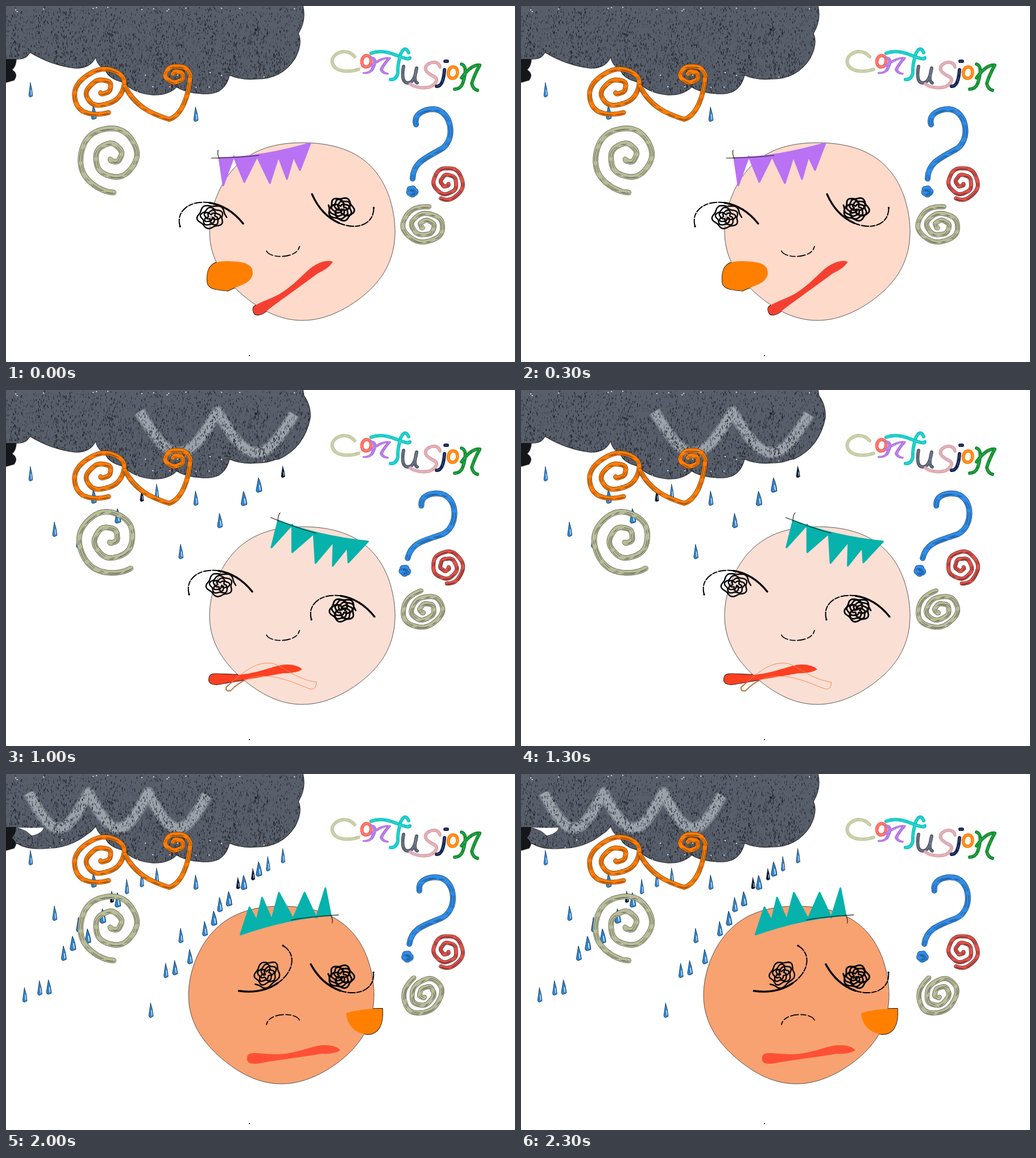
Animation, 895 px wide and 625 px high, one loop 2.5 s. Source, as an HTML page with a canvas:

```html
<!DOCTYPE html>
<html lang="en">
<head>
<meta charset="utf-8">
<title>Confusion</title>
<style>
html, body { margin: 0; width: 100%; height: 100%; overflow: hidden; background: #fff; }
canvas { display: block; }
</style>
</head>
<body>
<canvas id="stage" width="895" height="625"></canvas>
<script>
const ctx = document.getElementById('stage').getContext('2d');
const STEP = 500, POSES = 5, TAU = 2 * Math.PI;
const rad = deg => deg * Math.PI / 180;
const shape = d => new Path2D(d);

let seed = 1;
const rand = () => (seed = seed * 16807 % 2147483647) / 2147483647;

function fill(path, color) {
  ctx.fillStyle = color;
  ctx.fill(path);
}

function stroke(path, color, width, dash = []) {
  ctx.strokeStyle = color;
  ctx.lineWidth = width;
  ctx.setLineDash(dash);
  ctx.stroke(path);
}

// Moves the pivot to x, y and turns around it.
function posed([x, y, turn = 0], [px, py], draw) {
  ctx.save();
  ctx.translate(x, y);
  ctx.rotate(rad(turn));
  ctx.translate(-px, -py);
  draw();
  ctx.restore();
}

// Slightly shaky spiral from the outside in.
function coil({ x = 0, y = 0, from, to, start = 0, turns, flat = 1, tilt = 0, ease = 1, shake = .6 }) {
  const path = new Path2D(), steps = Math.ceil(Math.abs(turns) * 60);
  const c = Math.cos(rad(tilt)), s = Math.sin(rad(tilt));
  for (let i = 0; i <= steps; i++) {
    const t = i / steps, a = rad(start) + t * turns * TAU;
    const r = from + (to - from) * t ** ease + shake * Math.sin(a * 5.3);
    const u = r * Math.cos(a), v = r * flat * Math.sin(a);
    path.lineTo(x + u * c - v * s, y + u * s + v * c);
  }
  return path;
}

// Coloured band with a dark edge and loose dark scribbles inside.
function crayon(path, color, width, ink) {
  stroke(path, ink, width + 1);
  stroke(path, color, width - .4);
  for (const side of [-1, 1]) {
    posed([side * width * .22, width * .2], [0, 0],
      () => stroke(path, ink, .8, [13, 7, 22, 9, 6, 12]));
  }
}

// ---- cloud ----
const CLOUD = 'M0 0H522Q528 25 514 48Q522 66 508 92Q485 128 440 128Q412 130 393 121Q385 153 355 154' +
  'Q320 154 300 142Q285 157 258 156Q222 152 208 134Q180 128 175 112Q160 104 158 89Q148 110 122 109' +
  'Q80 104 42 81Q36 94 18 93Q17 107 10 112Q22 120 14 130L0 134Z';
const BULGES = ['', '',
  'M515 0Q536 20 535 48Q525 100 480 121L440 128V0Z',
  'M0 0L150 98Q110 112 75 95Q58 82 54 95Q45 106 25 108L0 125Z',
  'M0 60L158 92Q120 130 75 130Q40 134 20 122L0 125Z'];
const HOLE = shape('M20 94Q45 95 66 94Q64 104 45 108Q36 98 20 94Z');
const CHALK = [
  null,
  { x: 160, span: 72, count: 5, base: 62, height: 42 },
  { x: 235, span: 137, count: 2, base: 110, height: 72 },
  { x: 25, span: 95, count: 3, base: 85, height: 55 },
  { x: 40, span: 105, count: 3, base: 95, height: 62 }];

// Row of hanging bows that meet in upward points.
function bows({ x, span, count, base, height }) {
  const path = new Path2D();
  for (let s = 0; s <= count; s += .02) {
    path.lineTo(x + span * s, base - height * (1 - Math.abs(Math.sin(Math.PI * s))));
  }
  return path;
}

function drawCloud(k) {
  const cloud = shape(CLOUD + BULGES[k]);
  seed = 77;
  ctx.save();
  stroke(cloud, '#1a1c20', 1.6);
  ctx.clip(cloud);
  fill(cloud, '#585f6b');
  if (CHALK[k]) {
    ctx.lineCap = 'butt';
    const path = bows(CHALK[k]);
    stroke(path, 'rgba(190,195,200,.35)', 21);
    stroke(path, k === 1 ? 'rgba(190,195,200,.25)' : 'rgba(190,195,200,.5)', 15);
  }
  for (let i = 0; i < 5500; i++) {
    const x = rand() * 540, y = 160 * rand() ** .8;
    const streak = .6 + .4 * Math.sin(x * .11) * Math.sin(x * .037 + y * .02);
    ctx.fillStyle = rand() < streak ? '#1f2127' : '#464c57';
    ctx.fillRect(x, y, .5 + rand() * .9, 1 + rand() * 3.5);
  }
  fill(shape('M0 93H18Q17 107 10 112Q22 120 14 130L0 134Z'), '#15161a');
  ctx.fillStyle = '#fff';
  for (let i = 0; i < 40; i++) ctx.fillRect(rand() * 510, i % 3 ? 115 + rand() * 40 : rand() * 9, 2, 1.5);
  ctx.restore();
  if (k === 4) fill(HOLE, '#fff');
}

// ---- rain: more drops each pose, reaching further down ----
const DROP = shape('M-1 -13L-5 9Q-4 13 0 12L5 10Q4 -2 -1 -13Z');
const DROP_COUNT = [3, 6, 13, 22, 33];

function drawRain(k) {
  for (let i = 0; i < DROP_COUNT[k]; i++) {
    const born = DROP_COUNT.findIndex(n => i < n);
    const x = 20 + 470 * ((i * .618 + .05) % 1);
    const depth = (40 + 85 * born) * (1 - x / 900);
    const y = 137 + 40 * Math.sin(x / 500 * Math.PI) + depth * (i * .755 % 1);
    const fresh = born === k && i > 5 && i % 4 === 0;
    posed([x, y], [0, 0], () => {
      ctx.scale(.65 + i % 4 * .12, fresh ? .8 : 1);
      fill(DROP, fresh ? '#06102c' : '#3187d2');
      stroke(DROP, '#173a5c', 1);
      stroke(shape('M1 0L2 8'), '#fff', 1.4);
    });
  }
}

// ---- swirls and question mark, each swinging around its pivot ----
const GREEN = '#b9bd98', ORANGE = '#ff7d08', BLUE = '#2f8de8';
const SWIRLS = [
  { color: ORANGE, ink: '#6b3c0c', width: 7.5, pivot: [225, 157], swing: [0, 26, 0, -12, 0], paths: [
    coil({ x: 169, y: 147, from: 55, to: 7, start: 97, turns: 2.1, flat: .75, tilt: -25, ease: 1.2 }),
    shape('M209 141C228 178 258 190 287 199C310 192 322 155 324 122'),
    coil({ x: 299, y: 122, from: 25, to: 7, start: 0, turns: -1.4, flat: .75 })] },
  { color: GREEN, ink: '#55564a', width: 8.5, pivot: [180, 270], swing: [0, 28, -33, 180, 0], paths: [
    coil({ x: 187, y: 264, from: 63, to: 6, start: 88, turns: 2.1 })] },
  { color: '#e2524b', ink: '#5a2a28', width: 6, pivot: [775, 311], swing: [0, -32, -21, 30, 0], paths: [
    coil({ x: 775, y: 310, from: 30, to: 4, start: 110, turns: -2.2, ease: 1.3 })] },
  { color: GREEN, ink: '#55564a', width: 7.5, pivot: [737, 387], swing: [0, -45, -23, 0, -45], paths: [
    coil({ x: 737, y: 386, from: 43, to: 6, start: -81, turns: -2.4, flat: .8 })] },
  { color: BLUE, ink: '#1d4470', width: 9, pivot: [751, 254], swing: [0, 15, 11, 0, 7], paths: [
    shape('M721 208C716 190 735 181 752 181C784 183 793 236 764 252C735 268 716 276 715 303'),
    coil({ x: 714, y: 325, from: 6, to: 2, turns: 2 })] }];

function drawSwirls(k) {
  for (const { color, ink, width, pivot, swing, paths } of SWIRLS) {
    posed([...pivot, swing[k]], pivot, () => paths.forEach(p => crayon(p, color, width, ink)));
  }
}

// ---- lettering ----
const N = 'M12 2Q24 6 14 36Q10 46 0 46M12 26Q30 2 44 4Q34 22 30 36Q32 46 40 48';
const O = 'M11 0C0 -1 -2 20 9 20S21 1 11 0Z';
const LETTERS = [
  { x: 572, y: 79, color: '#c6cba4', d: 'M41 10Q33 0 20 1C-4 6 -4 28 16 34Q32 38 48 32' },
  { x: 624, y: 87, color: '#ff6a5e', d: O },
  { x: 630, y: 89, color: '#b377e6', d: N, tall: .62 },
  { x: 642, y: 72, color: '#12cbc4', d: 'M0 11Q18 4 43 14T68 19M66 10Q60 -4 52 12Q46 33 47 46Q44 58 34 57' },
  { x: 697, y: 104, color: '#585f70', d: 'M2 2Q-3 30 9 31T25 5Q19 28 26 31' },
  { x: 711, y: 97, color: '#dfa9b1', d: 'M52 10C49 -5 23 3 27 15S53 25 44 38S9 47 0 40' },
  { x: 757, y: 96, color: '#142452', d: 'M14 16Q12 46 0 45M15 1h4' },
  { x: 776, y: 107, color: '#ff8410', d: O },
  { x: 789, y: 100, color: '#128f30', d: N }];

function drawLetters() {
  for (const { x, y, color, d, tall = 1 } of LETTERS) {
    posed([x, y], [0, 0], () => {
      ctx.scale(1, tall);
      stroke(shape(d), color, 6);
      stroke(shape(d), 'rgba(255,255,255,.35)', .8, [9, 4]);
    });
  }
}

// ---- face ----
const HEAD = new Path2D();
for (let a = 0; a < TAU; a += .03) {
  const sin = Math.sin(a), cos = Math.cos(a);
  const r = 1 + Math.sin(2 * a) ** 2 * (.002 - .045 * sin + .012 * cos);
  HEAD.lineTo(521 + 163 * r * cos, 396 + 156 * r * sin);
}
HEAD.closePath();
const HEAD_POSE = [[0, 0], [-99, -2], [0, 0], [-88, -6], [-37, -8]];
const SKIN = ['#fedacb', '#fea090', '#fadfd5', '#fed8ca', '#f8a272'];

// Fringe: teeth with a valley halfway between neighbouring tips.
const TIPS = [[382, 315], [419, 309], [464, 311], [494, 304], [517, 288]];
const HAIR = shape('M375 267Q450 266 535 241');
[...TIPS].reverse().forEach(([x, y], i, tips) => {
  HAIR.lineTo(x, y);
  if (tips[i + 1]) HAIR.lineTo((x + tips[i + 1][0]) / 2, 264);
});
HAIR.closePath();
const TICK = shape('M361 267Q420 266 445 262M373 253Q371 259 375 268');
const HAIR_POSE = [[374, 266], [374, 266], [478, 228, 22.3], [360, 209], [572, 249, 177.2]];
const TEAL = '#06b2ab';
const HAIR_COLOR = ['#b872f3', TEAL, TEAL, '#a877ef', TEAL];

const LID = shape('M-53 17C-66 -28 10 -48 58 12');
const LEFT_COIL = coil({ x: 2, y: 1, from: 27, to: 4, turns: -4, flat: .84, shake: 2, ease: .9 });
const RIGHT_COIL = coil({ x: 2, y: 1, from: 23, to: 3, turns: -4.5, flat: .9, shake: 2, ease: 1.2 });
const LEFT_EYE = [[359, 370], [408, 367], [375, 342], [361, 365, 180], [460, 350, 137]];
const RIGHT_EYE = [[591, 357, 195], [637, 354], [590, 386], [588, 357], [591, 356, 190]];

const NOSE = shape('M458 430C464 444 512 444 516 422');
const NOSE_POSE = [[487, 431], [529, 414, 172], [487, 431], [487, 431], [487, 431, 180]];

const MOUTH = shape('M424 498C424 484 450 493 480 492C515 490 540 476 560 476Q580 476 588 485' +
  'Q578 492 555 491C525 496 480 502 450 507C430 512 422 506 424 498Z');
const MOUTH_POSE = [[505, 493, -27.5], [505, 492], [439, 499, -1], [506, 491, 23], [506, 492]];
const MOUTH_COLOR = ['#f54031', '#ff7f27', '#fd4022', '#ff7a00', '#ff5035'];

// Thin second mouths and cheeks: colour, darker edge off the head, outline.
const GHOSTS = [null,
  ['#5f8c98', '#1d4a5a', 'M398 508C400 492 440 504 470 503S540 487 570 486L568 500C530 506 500 511 450 522Q400 519 398 508Z'],
  ['#f58a4a', '#8a4a20', 'M387 522C420 492 440 476 470 480C500 493 510 507 546 513Q545 527 535 525C500 512 440 480 395 528Q386 530 387 522Z'],
  ['#a277a8', '#a277a8', 'M421 495C440 482 480 483 546 493C500 494 470 493 428 499Z'], null];
const CHEEKS = ['M354 485C352 460 360 447 390 448S434 452 434 470C430 490 408 490 390 500C372 498 356 498 354 485Z',
  '', '', '', 'M598 420Q625 411 662 412C664 440 655 457 635 457C612 455 600 440 598 420Z'];

function drawEye(pose, spiral, width) {
  posed(pose, [0, 0], () => {
    stroke(spiral, '#000', width);
    stroke(LID, '#000', 2, [13, 3, 8, 3]);
    stroke(LID, '#000', 3.4, [0, 80, 100, 0]);
  });
}

function drawFace(k) {
  const mouth = draw => posed(MOUTH_POSE[k], [506, 492], draw);
  const [tone, edge, d] = GHOSTS[k] || ['#000', '#000', ''];
  const ghost = shape(d), cheek = shape(CHEEKS[k]);

  // Dark outlines stay visible only outside the head.
  mouth(() => stroke(MOUTH, '#111', 1.8));
  stroke(ghost, edge, 1.8);
  stroke(cheek, '#111', 1.8);

  posed(HEAD_POSE[k], [0, 0], () => {
    fill(HEAD, SKIN[k]);
    stroke(HEAD, '#333', .8);
  });
  posed(HAIR_POSE[k], [374, 266], () => {
    fill(HAIR, HAIR_COLOR[k]);
    stroke(HAIR, HAIR_COLOR[k], 3);
    stroke(TICK, '#222', 1.2);
  });
  drawEye(LEFT_EYE[k], LEFT_COIL, 2.4);
  drawEye(RIGHT_EYE[k], RIGHT_COIL, 2.8);
  posed(NOSE_POSE[k], [487, 431], () => stroke(NOSE, '#000', 1.7, [14, 4, 9, 4]));
  mouth(() => fill(MOUTH, MOUTH_COLOR[k]));
  stroke(ghost, tone, 1);
  fill(cheek, '#ff7f00');
}

function draw(k) {
  ctx.fillStyle = '#fff';
  ctx.fillRect(0, 0, 895, 625);
  ctx.lineCap = ctx.lineJoin = 'round';
  drawCloud(k);
  drawRain(k);
  drawSwirls(k);
  drawLetters();
  drawFace(k);
  ctx.fillStyle = '#000';
  ctx.fillRect(427, 613, 2, 1.5);
}

let shown = -1;
function tick() {
  const k = Math.floor(performance.now() / STEP) % POSES;
  if (k !== shown) draw(shown = k);
  requestAnimationFrame(tick);
}
tick();
</script>
</body>
</html>
```
